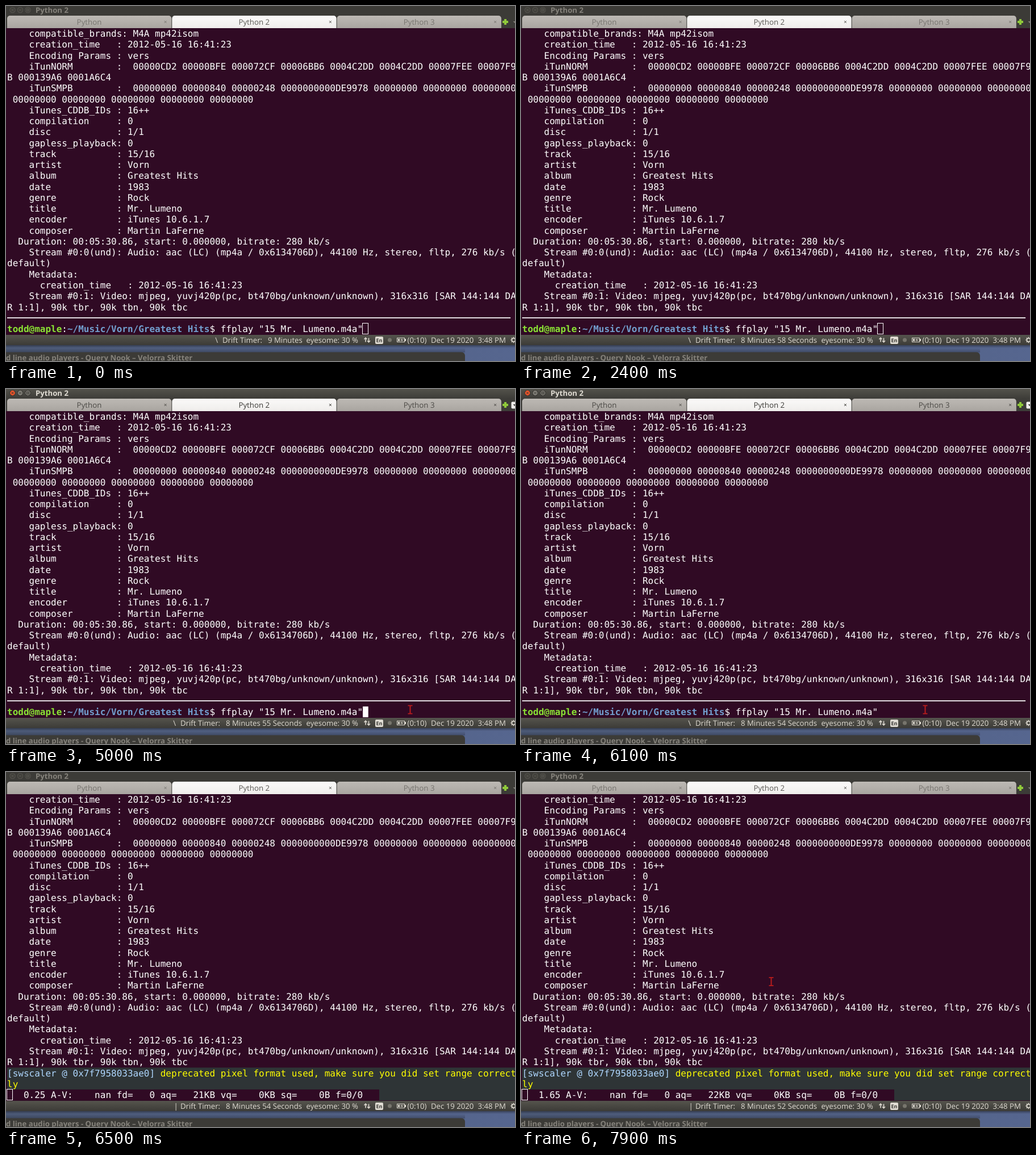
An HTML page with a canvas that plays this animation: 896 px wide and 625 px high, repeating every 8 s.

```html
<!DOCTYPE html>
<html lang="en">
<head>
<meta charset="utf-8">
<title>Terminal playback</title>
<style>
html, body { margin: 0; width: 100%; height: 100%; overflow: hidden; background: #300a24; }
canvas { display: block; }
</style>
</head>
<body>
<canvas id="stage" width="896" height="625"></canvas>
<script>
const ctx = document.getElementById('stage').getContext('2d');
const LOOP = 8000;
const CELL_W = 9.632, CELL_H = 19.26, LEFT = 2, TOP = 38.9, COLS = 93;
const MONO = '"DejaVu Sans Mono", monospace';
const SANS = '"Open Sans", "Noto Sans", sans-serif';
const PURPLE = '#300a24', SLATE = '#2e3436', PANEL_INK = '#dfdbd2';

const zeros = n => Array(n).fill('00000000').join(' ');
const field = (key, value, indent = 4) => ' '.repeat(indent) + key.padEnd(16) + ': ' + value;

const LOG = [
  field('compatible_brands', 'M4A mp42isom'),
  field('creation_time', '2012-05-16 16:41:23'),
  field('Encoding Params', 'vers'),
  field('iTunNORM', ' 00000CD2 00000BFE 000072CF 00006BB6 0004C2DD 0004C2DD 00007FEE 00007F9'),
  'B 000139A6 0001A6C4',
  field('iTunSMPB', ' 00000000 00000840 00000248 0000000000DE9978 ' + zeros(3)),
  ' ' + zeros(5),
  field('iTunes_CDDB_IDs', '16++'),
  field('compilation', '0'),
  field('disc', '1/1'),
  field('gapless_playback', '0'),
  field('track', '15/16'),
  field('artist', 'Vorn'),
  field('album', 'Greatest Hits'),
  field('date', '1983'),
  field('genre', 'Rock'),
  field('title', 'Mr. Lumeno'),
  field('encoder', 'iTunes 10.6.1.7'),
  field('composer', 'Martin LaFerne'),
  '  Duration: 00:05:30.86, start: 0.000000, bitrate: 280 kb/s',
  '    Stream #0:0(und): Audio: aac (LC) (mp4a / 0x6134706D), 44100 Hz, stereo, fltp, 276 kb/s (',
  'default)',
  '    Metadata:',
  field('creation_time', '2012-05-16 16:41:23', 6),
  '    Stream #0:1: Video: mjpeg, yuvj420p(pc, bt470bg/unknown/unknown), 316x316 [SAR 144:144 DA',
  'R 1:1], 90k tbr, 90k tbn, 90k tbc'
];

// Step tracks: [start time, value...]
const SPIN = [[0, '\\'], [100, '|'], [500, '/'], [800, '—'], [1100, '\\'], [1500, '|'],
  [1800, '/'], [2100, '—'], [2400, '\\'], [4500, '/'], [4600, '—'], [4800, '\\'], [5200, '|'],
  [5500, '/'], [5800, '—'], [6100, '\\'], [6500, '|'], [6700, '/'], [7000, '—'], [7400, '\\'], [7800, '|']];
const SECONDS = [[0, 60], [800, 59], [1800, 58], [4500, 56], [4800, 55], [5800, 54], [6700, 53], [7800, 52]];
const CLOCK = [[0, ''], [6500, '0.25'], [6700, '0.48'], [6900, '0.72'], [7200, '0.92'],
  [7400, '1.15'], [7600, '1.38'], [7800, '1.52'], [7900, '1.65']];
const POINTER = [[0, ''], [4500, 'arrow', 715.5, 590.5], [4600, 'beam', 718, 575],
  [4800, 'beam', 711.5, 564.5], [6200, ''], [7800, 'beam', 467, 372], [7900, 'beam', 440.5, 369]];
const CURSOR = [[0, 'hollow'], [4800, 'solid'], [5600, 'off'], [6200, 'solid'], [6500, 'hollow']];

const at = (track, t) => track.reduce((hit, step) => (step[0] <= t ? step : hit));

function box(x, y, w, h, fill) {
  ctx.fillStyle = fill;
  ctx.fillRect(x, y, w, h);
}

function fade(y, h, top, bottom) {
  const g = ctx.createLinearGradient(0, y, 0, y + h);
  g.addColorStop(0, top);
  g.addColorStop(1, bottom);
  return g;
}

function rounded(x, y, w, h, radii, fill) {
  ctx.fillStyle = fill;
  ctx.beginPath();
  ctx.roundRect(x, y, w, h, radii);
  ctx.fill();
}

function disc(x, y, r, fill) {
  ctx.fillStyle = fill;
  ctx.beginPath();
  ctx.arc(x, y, r, 0, 2 * Math.PI);
  ctx.fill();
}

function stroke(points, color, width = 1) {
  ctx.strokeStyle = color;
  ctx.lineWidth = width;
  ctx.beginPath();
  points.forEach(([x, y]) => ctx.lineTo(x, y));
  ctx.stroke();
}

function label(str, x, y, color, { size = 13.2, weight = 400, align = 'left' } = {}) {
  ctx.font = `${weight} ${size}px ${SANS}`;
  ctx.textAlign = align;
  ctx.fillStyle = color;
  ctx.fillText(str, x, y);
}

const cellX = col => LEFT + col * CELL_W;
const cellY = row => TOP + row * CELL_H;

// Writes text on the character grid and returns the next column.
function print(row, col, str, color = '#fff', weight = 400) {
  ctx.font = `${weight} 16px ${MONO}`;
  ctx.textAlign = 'left';
  ctx.fillStyle = color;
  for (const ch of str) {
    if (ch !== ' ') ctx.fillText(ch, cellX(col), cellY(row) + 15.1);
    col++;
  }
  return col;
}

function prompt(row) {
  let col = print(row, 0, 'todd@maple', '#8ae234', 700);
  col = print(row, col, ':');
  col = print(row, col, '~/Music/Vorn/Greatest Hits', '#729fcf', 700);
  return print(row, col, '$ ffplay "15 Mr. Lumeno.m4a"');
}

function caret(row, col, mode) {
  const x = cellX(col), y = cellY(row);
  if (mode === 'solid') box(x, y, CELL_W, CELL_H - 0.3, '#fff');
  if (mode === 'hollow') {
    ctx.strokeStyle = '#fff';
    ctx.lineWidth = 1;
    ctx.strokeRect(Math.round(x) - 0.5, Math.round(y) - 0.5, 10, 19);
  }
}

function drawTitle(focused) {
  box(0, 0, 896, 39, focused ? fade(0, 17, '#53524b', '#3d3c38') : '#3c3b37');
  [11.5, 25, 38.5].forEach((x, i) => {
    const ink = focused ? '#33322e' : '#5d5b55';
    disc(x, 7, 5.2, focused ? '#2f2e2a' : '#5a5852');
    disc(x, 7, 4.4, focused ? (i ? '#7b7972' : '#e9552b') : '#41403b');
    if (i === 0) {
      stroke([[x - 1.8, 5.2], [x + 1.8, 8.8]], ink);
      stroke([[x + 1.8, 5.2], [x - 1.8, 8.8]], ink);
    } else if (i === 1) {
      stroke([[x - 2, 7], [x + 2, 7]], ink);
    } else {
      ctx.strokeStyle = ink;
      ctx.strokeRect(x - 1.8, 5.3, 3.6, 3.4);
    }
  });
  label('Python 2', 52, 12, focused ? '#dfdbd2' : '#85827b', { weight: 700 });
}

function drawTabs(focused) {
  ['Python', 'Python 2', 'Python 3'].forEach((name, i) => {
    const x = 2 + i * 290.3, active = i === 1;
    const fill = active ? fade(17, 22, '#fbfaf9', '#efedeb') : fade(17, 22, '#bdb9b4', '#a9a5a0');
    rounded(x, 17, 289.3, 22, [5, 5, 0, 0], fill);
    const ink = active ? (focused ? '#3c3b37' : '#5c5a56') : (focused ? '#4c4a46' : '#77746f');
    label(name, x + 144.5, 33, ink, { size: 13.3, align: 'center' });
    const cx = x + 278.6;
    stroke([[cx - 2, 26], [cx + 2, 30]], ink);
    stroke([[cx + 2, 26], [cx - 2, 30]], ink);
  });
  box(877, 23, 4, 10, '#8fc93a');
  box(874, 26, 10, 4, '#8fc93a');
  if (focused) rounded(889.5, 22.5, 12, 12, 2, '#f0eeec');
  ctx.fillStyle = focused ? '#3c3b37' : '#85827b';
  ctx.beginPath();
  ctx.moveTo(892.5, 27);
  ctx.lineTo(898.5, 27);
  ctx.lineTo(895.5, 30);
  ctx.fill();
}

function drawTerminal(t, clock, cursor) {
  box(0, 39, 896, 540, PURPLE);
  const scroll = t >= 6200 ? 1 : 0;
  LOG.slice(scroll).forEach((line, row) => print(row, 0, line));
  if (clock) {
    box(LEFT, cellY(25), 894, 3 * CELL_H, SLATE);
    box(LEFT, cellY(27), 68 * CELL_W, CELL_H, PURPLE);
    const col = print(25, 0, '[swscaler @ 0x7f7958033ae0] ', '#afd7ff');
    print(25, col, 'deprecated pixel format used, make sure you did set range correct', '#ff0');
    print(26, 0, 'ly', '#ff0');
    const queue = t >= 6900 ? 22 : 21;
    print(27, 3, `${clock} A-V:    nan fd=   0 aq=   ${queue}KB vq=    0KB sq=    0B f=0/0`);
    caret(27, 0, cursor);
    return;
  }
  box(LEFT, cellY(26 - scroll) + 8.5, (COLS - 1) * CELL_W, 1.7, '#fff');
  const end = prompt(27 - scroll);
  caret(27, scroll ? 0 : end, cursor);
}

function drawPanel(spin, sec) {
  box(0, 579, 896, 18, fade(579, 18, '#55544d', '#3c3b37'));
  const full = sec === 60, x = full ? 381 : 307, y = 592.5;
  const mark = { '\\': -12.8, '|': -11.5, '/': -12.8, '—': -17 };
  label(spin, x + mark[spin], y, PANEL_INK);
  label('Drift Timer:', x, y, PANEL_INK);
  label(full ? '9 Minutes' : `8 Minutes ${sec} Seconds`, full ? 461 : 387, y, PANEL_INK);
  label('eyesome: 30 %', 528.5, y, PANEL_INK);
  label('(0:10)', 706.5, y, PANEL_INK);
  label('Dec 19 2020', 748, y, PANEL_INK);
  label('3:48 PM', 830.5, y, PANEL_INK);

  // Network arrows
  [[633, 1], [638.5, -1]].forEach(([ax, dir]) => {
    const tip = 588 - dir * 4.5;
    stroke([[ax, tip + dir], [ax, tip + dir * 8]], PANEL_INK, 1.6);
    stroke([[ax - 2.5, tip + dir * 3.2], [ax, tip + dir * 0.6], [ax + 2.5, tip + dir * 3.2]], PANEL_INK, 1.5);
  });
  rounded(650, 582, 14, 13, 2, PANEL_INK);
  label('En', 657, 592, '#3c3b37', { size: 9, weight: 700, align: 'center' });
  disc(675.5, 588, 3.5, '#77756d');

  // Battery
  ctx.strokeStyle = PANEL_INK;
  ctx.lineWidth = 1;
  ctx.strokeRect(688.5, 584.5, 13, 7);
  box(702, 586, 2, 4, PANEL_INK);
  box(690, 586, 3, 4, PANEL_INK);
  stroke([[694, 588.6], [697, 586.6], [696.4, 589.4], [699.5, 587.4]], PANEL_INK);

  // Gear
  for (let i = 0; i < 8; i++) {
    const a = i * Math.PI / 4, c = Math.cos(a), s = Math.sin(a);
    stroke([[893.5 + 3 * c, 588 + 3 * s], [893.5 + 5.2 * c, 588 + 5.2 * s]], PANEL_INK, 1.6);
  }
  ctx.strokeStyle = PANEL_INK;
  ctx.lineWidth = 1.4;
  ctx.beginPath();
  ctx.arc(893.5, 588, 3, 0, 2 * Math.PI);
  ctx.stroke();
}

function drawDesktop() {
  const g = ctx.createLinearGradient(0, 0, 896, 0);
  g.addColorStop(0, '#4d5b78');
  g.addColorStop(1, '#56668f');
  box(0, 597, 896, 28, g);
  box(0, 597, 896, 5, fade(597, 5, 'rgba(20,22,30,.45)', 'rgba(20,22,30,0)'));
  box(0, 602, 808, 8, fade(602, 8, 'rgba(20,22,30,0)', 'rgba(20,22,30,.3)'));
  rounded(-8, 609.5, 816, 20, [0, 6, 0, 0], '#3c3b37');
  label('d line audio players - Query Nook – Velorra Skitter', 0, 624, '#85827b', { weight: 700 });
}

function drawPointer([, kind, x, y]) {
  if (kind === 'beam') {
    const red = '#b81c1c';
    box(x - 1, y - 7, 2, 14, red);
    box(x - 4, y - 8, 8, 1.8, red);
    box(x - 4, y + 6.2, 8, 1.8, red);
  }
  if (kind === 'arrow') {
    const shape = [[0, 0], [0, 14.5], [3.4, 11.5], [6, 17.5], [8.8, 16.3], [6.2, 10.6], [10.4, 10.4]];
    ctx.beginPath();
    shape.forEach(([dx, dy]) => ctx.lineTo(x + dx, y + dy));
    ctx.closePath();
    ctx.fillStyle = '#dc1f1f';
    ctx.fill();
    ctx.strokeStyle = '#5c1414';
    ctx.lineWidth = 0.9;
    ctx.stroke();
  }
}

let lastKey = '';

function render(now) {
  const t = now % LOOP;
  const focused = t >= 4800 && t < 6500;
  const [spin, sec, clock, cursor] = [SPIN, SECONDS, CLOCK, CURSOR].map(track => at(track, t)[1]);
  const pointer = at(POINTER, t);
  const key = [focused, spin, sec, clock, cursor, pointer, t >= 6200].join();
  if (key !== lastKey) {
    lastKey = key;
    ctx.textRendering = 'geometricPrecision';
    drawTitle(focused);
    drawTabs(focused);
    drawTerminal(t, clock, cursor);
    drawPanel(spin, sec);
    drawDesktop();
    drawPointer(pointer);
  }
}

const start = performance.now();
function tick() {
  render(performance.now() - start);
  requestAnimationFrame(tick);
}
tick();
</script>
</body>
</html>
```
